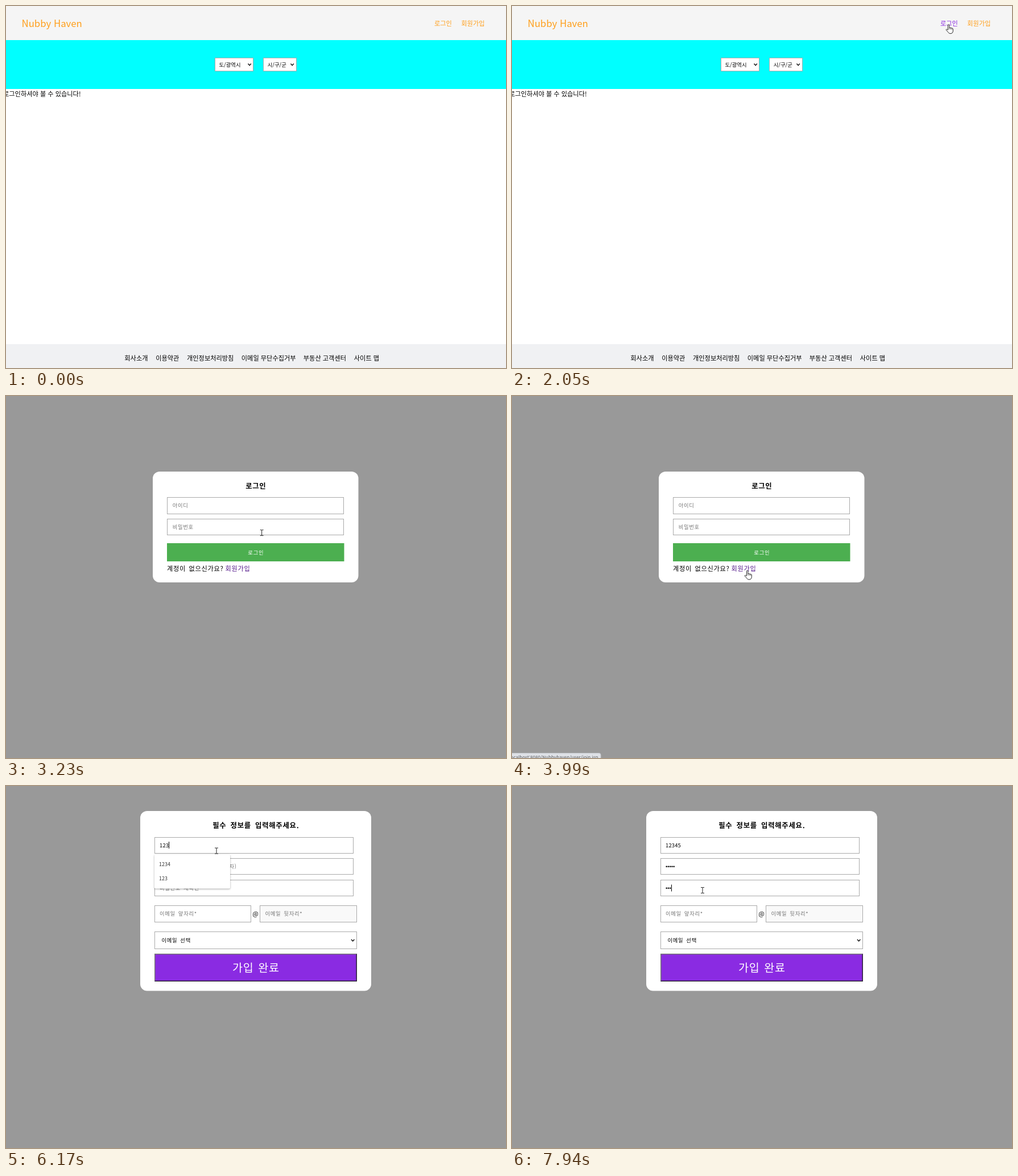
Write an HTML page that moves like this. It is 879 px wide and 637 px high and loops after 8 s.

```html
<!DOCTYPE html>
<html lang="ko">
<head>
<meta charset="utf-8">
<title>Login and sign-up</title>
<style>
html, body { margin: 0; width: 100%; height: 100%; overflow: hidden; background: #fff; }
svg { display: block; width: 879px; height: 637px; }
text { font: 11.2px "Noto Sans CJK KR", "Noto Sans CJK", sans-serif; white-space: pre; }
.mid { text-anchor: middle; }
.link { fill: #ff9f1c; }
.link.hover { fill: #8a2be2; }
.logo { font-size: 16.8px; }
.small { font-size: 9.33px; }
.box { fill: #fff; stroke: #aaa; }
.chevron { fill: none; stroke: #111; stroke-width: 1.5; }
.modal text { letter-spacing: .7px; word-spacing: 1.7px; }
.modal .title { font-size: 12.4px; font-weight: 700; word-spacing: 3px; }
.modal .hint { font-size: 9.33px; fill: #757575; }
.modal .typed { font-size: 9.33px; letter-spacing: .2px; }
.modal .dots { font: 9.33px "Liberation Sans", sans-serif; letter-spacing: 0; }
.modal .item { font-size: 8.8px; letter-spacing: .1px; fill: #333; }
.menu rect { fill: #fff; filter: drop-shadow(0 1px 1.5px rgba(0, 0, 0, .35)); }
.cursor path { stroke-linejoin: round; stroke-linecap: round; }
</style>
</head>
<body>
<svg viewBox="0 0 879 637">
  <defs><path id="chevron" class="chevron" d="M-2.7-1.4 0 1.4 2.7-1.4"/></defs>

  <g id="home">
    <rect width="879" height="637" fill="#fff"/>
    <rect width="879" height="60" fill="#f5f5f5"/>
    <rect y="60" width="879" height="86" fill="#0ff"/>
    <rect y="595" width="879" height="42" fill="#f0f1f3"/>
    <text class="link logo" x="27.5" y="37">Nubby Haven</text>
    <text class="link" id="login" x="753" y="34.5">로그인</text>
    <text class="link" x="800.3" y="34.5">회원가입</text>
    <rect class="box" x="367.5" y="91.5" width="67" height="23"/>
    <text class="small" x="374.5" y="107">도/광역시</text>
    <use href="#chevron" x="428.2" y="103"/>
    <rect class="box" x="452.5" y="91.5" width="58" height="23"/>
    <text class="small" x="459.7" y="107">시/구/군</text>
    <use href="#chevron" x="503.2" y="103"/>
    <text x="-5" y="159">로그인하셔야 볼 수 있습니다!</text>
    <text x="208.3" y="623.5">회사소개</text>
    <text x="263.2" y="623.5">이용약관</text>
    <text x="318" y="623.5">개인정보처리방침</text>
    <text x="413.8" y="623.5">이메일 무단수집거부</text>
    <text x="522.8" y="623.5">부동산 고객센터</text>
    <text x="611.8" y="623.5">사이트 맵</text>
  </g>

  <rect id="dim" width="879" height="637" fill="#999"/>

  <g id="signin" class="modal">
    <rect x="258" y="133" width="361.5" height="195" rx="12" fill="#fff"/>
    <text class="title mid" x="439.3" y="162.6">로그인</text>
    <rect class="box" x="283.5" y="178.5" width="310" height="29"/>
    <text class="hint" x="292.7" y="196.4">아이디</text>
    <rect class="box" x="283.5" y="216.5" width="310" height="28"/>
    <text class="hint" x="292.7" y="233.9">비밀번호</text>
    <rect x="283" y="259" width="311.5" height="32" fill="#4caf50"/>
    <text class="small mid" x="439.3" y="278.9" fill="#fff">로그인</text>
    <text x="283" y="308.4">계정이 없으신가요?</text>
    <text x="385.5" y="308.4" fill="#551a8b">회원가입</text>
  </g>

  <g id="signup" class="modal">
    <rect x="236" y="44" width="406" height="316.5" rx="12" fill="#fff"/>
    <text class="title mid" x="439.3" y="73.7">필수 정보를 입력해주세요.</text>
    <rect class="box" x="261.5" y="90.5" width="349" height="28"/>
    <rect class="box" x="261.5" y="127.5" width="349" height="28"/>
    <rect class="box" x="261.5" y="165.5" width="349" height="28"/>
    <text class="hint" id="idHint" x="270" y="107.7">아이디*(4~20자)</text>
    <text class="hint" id="passHint" x="270" y="145.2" style="word-spacing:0">비밀번호* (영문+숫자, 8~20자)</text>
    <text class="hint" id="againHint" x="270" y="182.5">비밀번호 재확인*</text>
    <text class="typed" id="id" x="270" y="107.9"></text>
    <text class="dots" id="pass" x="270" y="145.3"></text>
    <text class="dots" id="again" x="270" y="182.8"></text>
    <rect class="box" x="261.5" y="210.5" width="169" height="29"/>
    <text class="hint" x="270" y="228.4">이메일 앞자리*</text>
    <text class="mid" x="439" y="228.8">@</text>
    <rect class="box" x="446.5" y="210.5" width="170" height="29" style="fill:#f9f9f9"/>
    <text class="hint" x="455.5" y="228.4">이메일 뒷자리*</text>
    <rect class="box" x="261.5" y="256.5" width="355" height="30"/>
    <text class="small" x="273.5" y="274.9">이메일 선택</text>
    <use href="#chevron" x="609.7" y="271.5"/>
    <rect x="261" y="295" width="356" height="49" fill="#8a2be2"/>
    <path d="M261 344V295H617L615.5 296.5H262.5V342.5Z" fill="#767676"/>
    <path d="M617 295V344H261L262.5 342.5H615.5V296.5Z" fill="#2b2433"/>
    <text class="mid" x="439.4" y="326.8" fill="#fff" style="font-size:19.6px">가입 완료</text>
    <g id="menu" class="menu"><rect x="261" y="120.5" width="133" rx="2"/></g>
    <rect id="caret" width="1" height="12"/>
  </g>

  <g id="status">
    <path d="M-1 628.5H153q3 0 3 3V638H-1Z" fill="#dee1e6" stroke="#c4c7cc"/>
    <text x="151.5" y="639" text-anchor="end" fill="#5a5d62" style="font-size:8.1px">localhost:8080/Nubbyhaven/user/join.jsp</text>
  </g>

  <g id="cursor" class="cursor">
    <path id="arrow" fill="#fff" stroke="#000" stroke-width=".8" d="M0 0V11.5L2.7 9 4.6 13.2 6.4 12.4 4.6 8.3H8.2Z"/>
    <g id="hand">
      <path fill="#fff" stroke="#222" d="M-1.4 9.2V1.4a1.25 1.25 0 0 1 2.5 0V6c.5-.8 2-.7 2.3.3.6-.7 2-.5 2.2.5.8-.4 1.9 0 1.9 1.2v3.4c0 2.6-1.5 4.6-4.4 4.6-2.5 0-3.5-1.2-4.5-2.9L-4.4 10c-.8-1.4.7-2.2 1.6-1.2Z"/>
      <path fill="none" stroke="#222" stroke-width=".7" d="M1.1 6V8.4M3.4 6.4V8.6M5.6 7V8.8"/>
    </g>
    <path id="beam" fill="none" stroke="#222" d="M-2.5-5H-.7L0-4.5.7-5H2.5M0-4.5V4.5M-2.5 5H-.7L0 4.5.7 5H2.5"/>
  </g>
</svg>

<script>
const LOOP = 8000;
const $ = id => document.getElementById(id);
const show = (id, on) => { $(id).style.display = on ? "" : "none"; };

// time, x, y, pointer shape from that time on
const track = [
  [70, 856, 504, "arrow"], [230, 838, 330, "arrow"], [390, 800, 120, "arrow"],
  [520, 768, 12, "arrow"], [640, 745, 4, "arrow"], [810, 772, 17, "arrow"],
  [890, 778, 27, "hand"], [1100, 770, 35, "hand"], [1350, 767.8, 32.5, "hand"],
  [2210, 767.8, 32.5, "hand"], [2290, 725, 52, "arrow"], [2450, 560, 130, "arrow"],
  [2600, 484, 174, "arrow"], [2830, 483, 180, "beam"], [3100, 462, 216, "beam"],
  [3270, 446, 248, "arrow"], [3340, 438, 262, "hand"], [3600, 413.8, 307, "hand"],
  [4370, 413.8, 307, "hand"], [4460, 406, 286, "arrow"], [4560, 392, 205, "beam"],
  [4760, 371, 115.5, "beam"], [4900, 371, 115.5, "beam"], [5160, 370, 114, "beam"],
  [6540, 370, 114, "beam"], [6710, 354, 141, "beam"], [7390, 354, 141, "beam"],
  [7560, 335, 183.5, "beam"]
];

const idKeys = [6020, 6090, 6170, 6320, 6470];
const passKeys = [6860, 7010, 7090, 7170, 7320];
const againKeys = [7710, 7860, 7940];
const past = ["1234", "123", "12", "1212", "1", "1111"];

const count = (keys, t) => keys.filter(k => t >= k).length;

const items = past.map(word => {
  const el = document.createElementNS("http://www.w3.org/2000/svg", "text");
  el.setAttribute("class", "item");
  el.setAttribute("x", 269);
  el.textContent = word;
  return $("menu").appendChild(el);
});

function drawCursor(t) {
  show("cursor", t >= track[0][0]);
  const i = Math.max(0, track.findLastIndex(p => p[0] <= t));
  const a = track[i], b = track[i + 1] || a;
  const k = b === a ? 0 : Math.max(0, (t - a[0]) / (b[0] - a[0]));
  const at = n => a[n] + (b[n] - a[n]) * k;
  $("cursor").setAttribute("transform", `translate(${at(1)} ${at(2)})`);
  for (const shape of ["arrow", "hand", "beam"]) show(shape, shape === a[3]);
}

function drawMenu(typed) {
  const open = typed.length > 0 && typed.length < 4;
  show("menu", open);
  if (!open) return;
  let row = 0;
  for (const el of items) {
    const match = el.textContent.startsWith(typed);
    el.style.display = match ? "" : "none";
    if (match) el.setAttribute("y", 141.2 + 25 * row++);
  }
  $("menu").firstElementChild.setAttribute("height", 10 + 25 * row);
}

function drawField(id, value) {
  $(id).textContent = value;
  show(id + "Hint", !value);
}

function drawForm(t) {
  const typed = "12345".slice(0, count(idKeys, t));
  const pass = count(passKeys, t), again = count(againKeys, t);
  drawField("id", typed);
  drawField("pass", "•".repeat(pass));
  drawField("again", "•".repeat(again));
  drawMenu(typed);

  const [x, y] = t < 6710 ? [typed.length * 5.35, 98]
    : t < 7560 ? [pass * 3.27, 136] : [again * 3.27, 173.5];
  $("caret").setAttribute("x", Math.round(270 + x));
  $("caret").setAttribute("y", y);
  show("caret", t >= 5160 && (t < 5620 || t >= 6020));
}

function draw(t) {
  show("home", t < 2210);
  show("dim", t >= 2210);
  show("signin", t >= 2210 && t < 4070);
  show("signup", t >= 4070);
  show("status", t >= 3770 && t < 4380);
  $("login").classList.toggle("hover", t >= 890);
  drawForm(t);
  drawCursor(t);
}

const start = performance.now();
function tick() {
  draw((performance.now() - start) % LOOP);
  requestAnimationFrame(tick);
}
tick();
</script>
</body>
</html>
```
